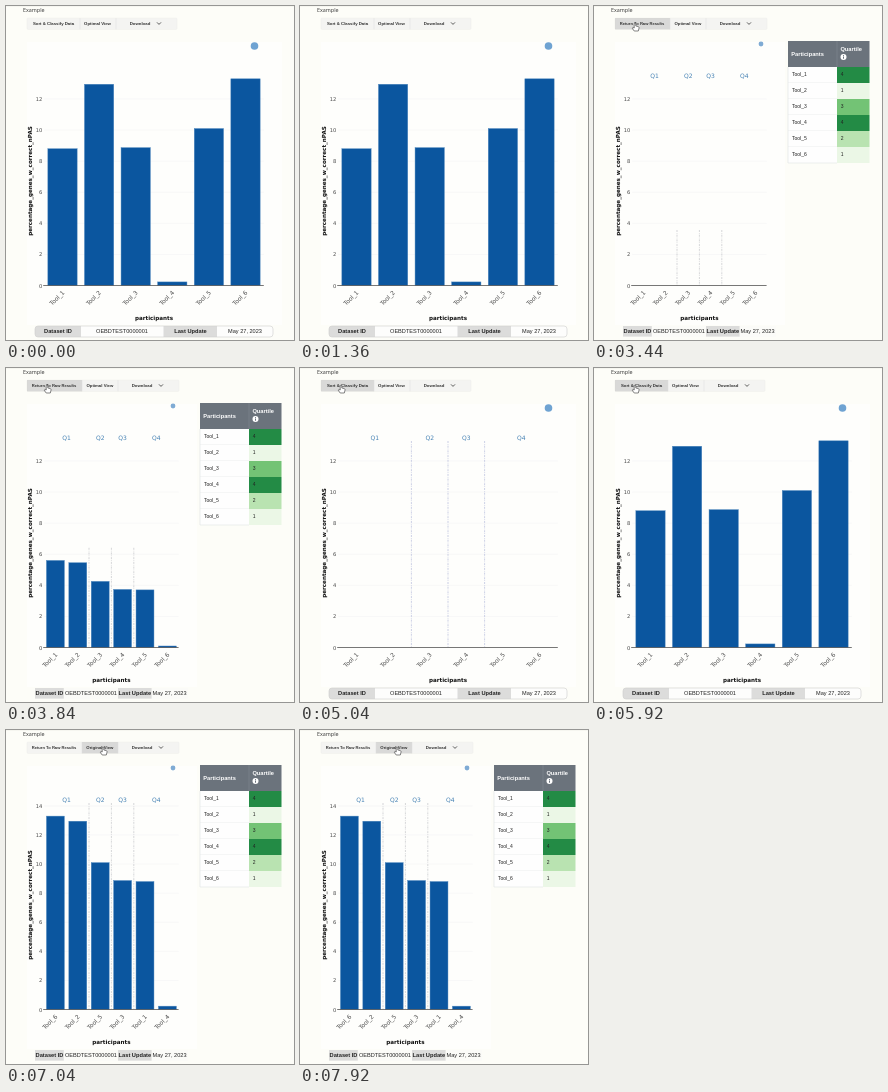
An HTML page that plays this animation: 288 px wide and 334 px high, repeating every 8000 ms.

```html
<!DOCTYPE html>
<html lang="en">
<head>
<meta charset="utf-8">
<title>Sort and classify chart</title>
<style>
html, body { margin: 0; width: 100%; height: 100%; overflow: hidden; background: #fdfdf8; }
svg { display: block; width: 100vw; height: 100vh; }
text { dominant-baseline: central; fill: #222; font: 5.6px "Liberation Sans", Arial, sans-serif; }
.plot { font: 5.2px "DejaVu Sans", Verdana, sans-serif; fill: #4a4a4a; }
.tool { font-size: 5.9px; }
.q { font-size: 6px; fill: #4682b4; }
.title { font: 700 5.6px "DejaVu Sans", Verdana, sans-serif; fill: #111; }
.head { font: 5.4px "Open Sans", sans-serif; fill: #333; }
.btn { font-weight: 700; font-size: 4.3px; fill: #333; }
.long { font-size: 4.1px; }
.bold { font-weight: 700; font-size: 5.7px; }
.light { fill: #fff; }
.cell { font-size: 5px; }
</style>
</head>
<body>
<svg id="stage" viewBox="0 0 288 334" preserveAspectRatio="none"></svg>
<script>
const LOOP = 8000, GROW = 720;
const SORT_1 = 3440, RAW = 4880, SORT_2 = 6000, OPTIMAL = 6920;
const stage = document.getElementById('stage');

const values = [8.8, 12.95, 8.87, 0.23, 10.1, 13.3];
const order = [0, 1, 2, 3, 4, 5];
const sorted = [...order].sort((a, b) => values[b] - values[a]);
const quartiles = [4, 1, 3, 4, 2, 1];
const greens = ['', '#ebf7e6', '#b9e3b1', '#73c375', '#238b45'];

// time, x, y of the pointer
const path = [
  [1760, 46, -8], [2320, 41, 9], [2560, 40, 11], [2640, 40, 11],
  [2880, 41, 17], [6040, 41, 17], [6400, 106, 12], [6720, 97, 17]
];

const clamp = x => Math.min(1, Math.max(0, x));
const cubic = x => x < 0.5 ? 4 * x ** 3 : 1 - (2 - 2 * x) ** 3 / 2;
const rect = (x, y, w, h, fill, extra = '') =>
  `<rect x="${x}" y="${y}" width="${w}" height="${h}" fill="${fill}" ${extra}/>`;
const line = (x1, y1, x2, y2, color, w = 0.6, extra = '') =>
  `<path d="M${x1} ${y1}L${x2} ${y2}" stroke="${color}" stroke-width="${w}" fill="none" ${extra}/>`;
const text = (s, x, y, cls = '', anchor = 'middle', extra = '') =>
  `<text x="${x}" y="${y}" class="${cls}" text-anchor="${anchor}" ${extra}>${s}</text>`;

function stateAt(t) {
  const narrow = (t >= SORT_1 && t < RAW) || t >= SORT_2;
  const start = t >= SORT_2 ? 6114 : t >= RAW ? 5040 : t >= SORT_1 ? 3500 : -GROW;
  const p = clamp((t - start) / GROW);
  return {
    narrow, p, grow: cubic(p),
    marks: narrow || (t >= RAW && p < 1),
    table: narrow && (t < RAW || t >= 6120),
    optimal: t >= OPTIMAL
  };
}

function toolbar(t, s) {
  const dx = s.narrow ? 2 : 0, a = 74 + dx, b = 110 + dx;
  const hover = (from, to) => {
    const k = clamp((t - from) / 160) * (1 - clamp((t - to) / 400));
    return `rgba(0,0,0,${0.11 * k})`;
  };
  return text('Example', 17, 4.3, 'head', 'start') +
    line(0, 0.4, 288, 0.4, '#eeeeea') +
    rect(21, 12, 150 + dx, 11.4, '#f4f4f2', 'rx="1" stroke="#ececea" stroke-width=".5"') +
    rect(21, 12, a - 21, 11.4, hover(2720, 6180)) +
    rect(a, 12, 36, 11.4, hover(6400, 9000)) +
    line(a, 12, a, 23.4, '#dededc', 0.5) + line(b, 12, b, 23.4, '#dededc', 0.5) +
    (s.narrow ? text('Return To Raw Results', 48, 17.5, 'btn long')
              : text('Sort &amp; Classify Data', 47.5, 17.5, 'btn')) +
    text(s.optimal ? 'Original View' : 'Optimal View', 91.5 + dx * 1.2, 17.5, 'btn') +
    text('Download', 134 + dx, 17.3, 'btn') +
    `<path d="M${151 + dx} 16.4l2 2l2 -2" fill="none" stroke="#333" stroke-width=".8"/>`;
}

function chart(s) {
  const left = 38.2, base = 279.5, pitch = s.narrow ? 22.4 : 36.6;
  const right = left + pitch * 6, unit = s.optimal ? 14.54 : 15.54;
  const mid = i => left + pitch * (i + 0.5);
  const bars = s.narrow ? sorted : order;
  const names = s.narrow && s.p === 1 ? sorted : order;
  let out = rect(21, 36, s.narrow ? 170 : 255, 283, '#fefefc');

  for (let v = 0; v <= (s.optimal ? 14 : 12); v += 2) {
    const y = base - v * unit;
    if (v) out += line(left, y, right, y, '#eeeef0', 0.5);
    out += text(v, 36.3, y, 'plot', 'end');
  }
  bars.forEach((tool, i) => {
    const h = values[tool] * s.grow * unit;
    if (h > 0) out += rect(mid(i) - pitch * 0.4, base - h, pitch * 0.8, h, '#0b569f',
      'stroke="#4d86bd" stroke-width=".45"');
  });
  if (s.marks) {
    const top = s.narrow && s.p < 1 ? 224 - 105 * s.grow : 73;
    [2, 3, 4].forEach(n => {
      const x = left + pitch * n;
      out += line(x, top, x, base, s.narrow ? '#b9bac0' : '#a9b0d6', 0.6, 'stroke-dasharray="2 1 .7 1"');
    });
    [0.5, 2, 3, 4.5].forEach((n, i) => out += text('Q' + (i + 1), mid(n), 69, 'plot q'));
  }
  out += line(left - 1, base, right, base, '#555', 0.8);
  names.forEach((tool, i) => {
    const x = mid(i) + 1;
    out += text('Tool_' + (tool + 1), x, 285.6, 'plot tool', 'end', `transform="rotate(-45 ${x} 285.6)"`);
  });
  out += text('participants', (left + right) / 2, 311.5, 'title') +
    text('percentage_genes_w_correct_nPAS', 24, 175, 'title', 'middle', 'transform="rotate(-90 24 175)"');
  return out + (s.narrow ? '<circle cx="167" cy="38" r="2.4" fill="#7fabd4"/>'
                         : '<circle cx="248.5" cy="40" r="3.8" fill="#6fa3d2"/>');
}

function footer(s) {
  const id = 'OEBDTEST0000001', date = 'May 27, 2023', y = 325.4;
  if (s.narrow) {
    return rect(29, 320, 153, 10.6, '#fbfbf8') +
      rect(29, 320, 28.8, 10.6, '#dcdcdb') + rect(112, 320, 33.6, 10.6, '#dcdcdb') +
      text('Dataset ID', 29.6, y, 'bold', 'start') + text(id, 59, y, '', 'start') +
      text('Last Update', 112.6, y, 'bold', 'start') + text(date, 146.6, y, '', 'start');
  }
  return rect(29, 320, 238, 11, '#fdfdfc', 'rx="3"') +
    '<path d="M75 320H32q-3 0 -3 3v5q0 3 3 3H75z" fill="#dcdcdb"/>' +
    rect(157.5, 320, 53.5, 11, '#dcdcdb') +
    rect(29, 320, 238, 11, 'none', 'rx="3" stroke="#cfcfcd" stroke-width=".6"') +
    text('Dataset ID', 52, y, 'bold') + text(id, 116, y) +
    text('Last Update', 184.5, y, 'bold') + text(date, 239, y);
}

function table() {
  const x = 194, split = 243, right = 275.5, top = 61, row = 16;
  let out = rect(x, 35, right - x, top - 35, '#6b737c') +
    line(split, 35, split, top, '#858c94', 0.5) +
    text('Participants', 197.3, 47.6, 'bold light', 'start') +
    text('Quartile', 246.4, 43, 'bold light', 'start') +
    '<circle cx="249.5" cy="51" r="3" fill="#fff"/>' +
    rect(249, 50.5, 1, 2.2, '#6b737c') + rect(249, 49, 1, 0.9, '#6b737c');
  quartiles.forEach((q, i) => {
    const y = top + row * i;
    out += rect(x, y, split - x, row, '#fefefe') + rect(split, y, right - split, row, greens[q]) +
      line(x, y + row, split, y + row, '#dee2e3', 0.6) +
      text('Tool_' + (i + 1), 198, y + 7.3, 'cell', 'start') +
      text(q, 246.7, y + 7.3, 'cell', 'start');
  });
  return out + line(x, top, x, top + row * 6, '#dee2e3', 0.6);
}

function pointer(t) {
  if (t < path[0][0]) return '';
  let i = path.findIndex(p => p[0] > t);
  if (i < 0) i = path.length;
  const a = path[i - 1], b = path[i] || a;
  const k = b === a ? 0 : (t - a[0]) / (b[0] - a[0]);
  const e = k * k * (3 - 2 * k);
  const x = a[1] + (b[1] - a[1]) * e, y = a[2] + (b[2] - a[2]) * e;
  const shape = t < 2720
    ? 'M0 0V6.2L1.5 4.9L2.5 7L3.5 6.5L2.5 4.6H4.4Z'
    : 'M-.8 .6Q0 -.6 .8 .6V3L3.4 3.6Q4.2 4 4 5.2L3.3 8H-.8L-2.8 5.2Q-2.4 4 -.8 5Z';
  return `<path transform="translate(${x} ${y})" d="${shape}" fill="#fff" stroke="#333" stroke-width=".6" stroke-linejoin="round"/>`;
}

function draw(t) {
  const s = stateAt(t);
  stage.innerHTML = toolbar(t, s) + chart(s) + footer(s) + (s.table ? table() : '') + pointer(t);
}

let origin;
function tick(now) {
  origin ??= now;
  draw((now - origin) % LOOP);
  requestAnimationFrame(tick);
}
draw(0);
requestAnimationFrame(tick);
</script>
</body>
</html>
```
